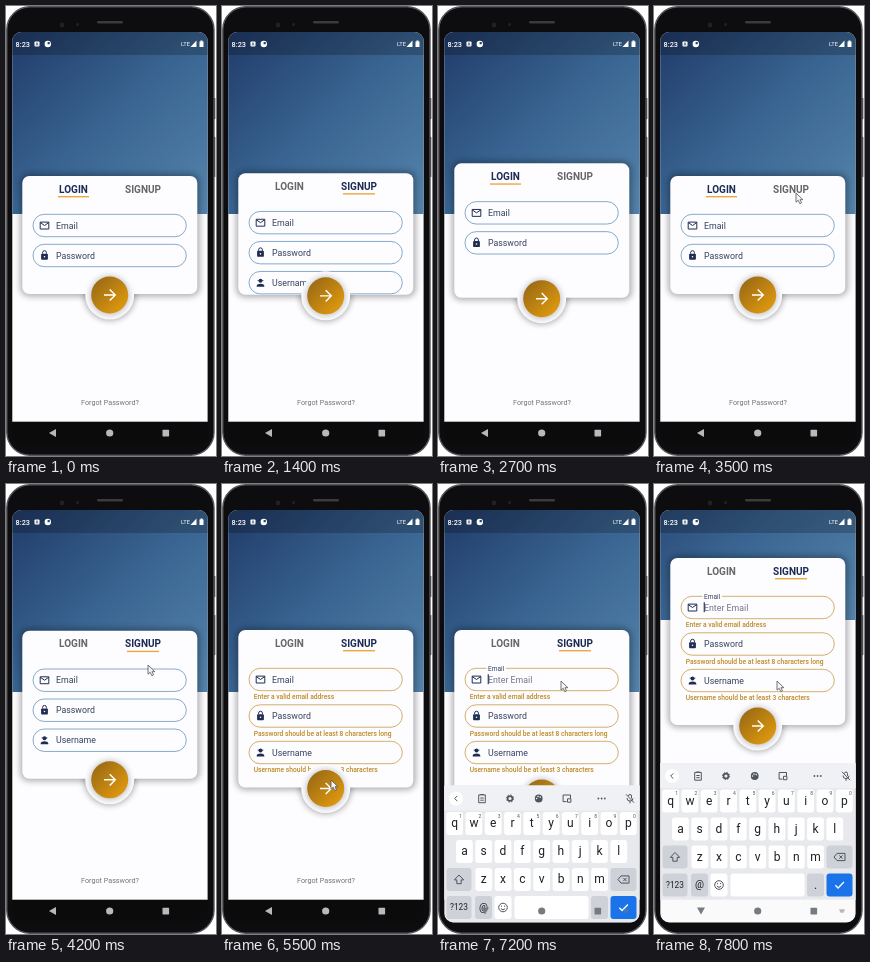
Animation of 210x450 px, one loop 8000 ms. Source, as an HTML page:

```html
<!DOCTYPE html>
<html lang="en">
<head>
<meta charset="utf-8">
<title>Login and signup</title>
<style>
  html, body { margin: 0; width: 100%; height: 100%; overflow: hidden; background: #fff; }
  svg { display: block; width: 210px; height: 450px; font-family: Roboto, sans-serif; }
  .mid { text-anchor: middle; }
  .tab { font-size: 10px; font-weight: 700; text-anchor: middle; }
  .label { font-size: 8.8px; fill: #35425f; }
  .box { fill: none; stroke-width: .8; }
  .error { font-size: 6.7px; font-weight: 500; fill: #bd8a26; }
  .line { fill: none; stroke: #1f2d52; stroke-width: 1; }
  .solid { fill: #1f2d52; }
  .tool { fill: none; stroke: #50555c; stroke-width: 1; }
</style>
</head>
<body>
<svg viewBox="0 0 210 450">
  <defs>
    <linearGradient id="sky" x1="0" y1="0" x2="1" y2="1">
      <stop offset="0" stop-color="#203b69"/>
      <stop offset=".5" stop-color="#3a6592"/>
      <stop offset="1" stop-color="#5584ac"/>
    </linearGradient>
    <linearGradient id="gold" x1="0" y1="0" x2="1" y2="1">
      <stop offset=".1" stop-color="#9a6a14"/>
      <stop offset=".9" stop-color="#e09a0e"/>
    </linearGradient>
    <filter id="soft" x="-30%" y="-30%" width="160%" height="160%"><feGaussianBlur stdDeviation="3"/></filter>
    <clipPath id="screen"><rect x="6.3" y="26" width="195.3" height="412.5" rx="9"/></clipPath>
    <clipPath id="cardClip"><rect id="clipBox" x="16.3" width="175" rx="7"/></clipPath>
  </defs>

  <path d="M207 92h2.3v21H207zM207 131h2.3v40H207z" fill="#333"/>
  <rect x=".8" y=".8" width="207.2" height="448.4" rx="23" fill="#0d0d0f" stroke="#55555a" stroke-width="1.4"/>
  <rect x="91" y="15" width="26" height="2.5" rx="1.2" fill="#3b3b3d"/>
  <g fill="#222226"><circle cx="56" cy="19" r="2.4"/><circle cx="71.5" cy="18.5" r="1.5"/></g>

  <g clip-path="url(#screen)">
    <rect x="6" y="26" width="197" height="390" fill="#fdfcfe"/>
    <g id="page">
      <rect x="6" y="26" width="197" height="182" fill="url(#sky)"/>
      <rect id="cardShadow" x="14" width="180" rx="9" opacity=".3" filter="url(#soft)"/>
      <circle id="buttonShadow" cx="103.7" r="25.5" opacity=".32" filter="url(#soft)"/>
      <rect id="card" x="16.3" width="175" rx="7" fill="#fdfcfe"/>
      <g clip-path="url(#cardClip)"><g id="form">
        <text id="login" class="tab" x="67.5" y="16.6">LOGIN</text>
        <text id="signup" class="tab" x="137" y="16.6">SIGNUP</text>
        <rect id="underline" y="20" height="1.4" fill="#eba83f"/>
        <g id="fields"></g>
      </g></g>
      <g id="button">
        <circle r="24.5" fill="#fdfcfe"/>
        <circle cy=".5" r="19.5" opacity=".25" filter="url(#soft)"/>
        <circle r="18.5" fill="url(#gold)"/>
        <path d="M-5.7 0H5.5M0-5.6L5.6 0L0 5.6" fill="none" stroke="#fff" stroke-width="1.4"/>
      </g>
      <text class="mid" x="104" y="399.4" font-size="7.2" fill="#747478">Forgot Password?</text>
    </g>

    <rect x="6" y="26" width="197" height="23" opacity=".22"/>
    <g fill="#fff">
      <text x="9.6" y="40.5" font-size="7.3" font-weight="500">8:23</text>
      <rect x="28.5" y="35.5" width="5" height="5" rx=".8"/>
      <path d="M30 39.6l1-3 1 3" fill="none" stroke="#29456a" stroke-width=".7"/>
      <circle cx="41.8" cy="38" r="3.2"/>
      <path d="M41.6 38.2v-2.2h2.2v2.2z" fill="#29456a"/>
      <text x="175" y="40.2" font-size="5.8">LTE</text>
      <path d="M184.5 41l6-6.5V41zM193.5 35.4h1v-.9h2v.9h1V41h-4z"/>
    </g>

    <rect x="6" y="415.7" width="197" height="24" fill="#0b0b0c"/>
    <g id="keyboard"></g>
    <g id="nav">
      <path id="back"/>
      <circle cx="103.7" cy="427" r="3.6"/>
      <rect x="156.5" y="423.8" width="6.6" height="6.6" rx=".6"/>
      <path id="switcher" d="M185 425.3h6l-1.5 3.5h-3z" opacity=".5"/>
    </g>
  </g>
  <path id="cursor" d="M0 0V9.2L2.2 7.3L3.8 10.7L5.5 9.9L4 6.7H6.9Z" fill="#f4f4f4" stroke="#555" stroke-width=".8"/>
</svg>

<script>
const $ = id => document.getElementById(id);
const set = (id, attrs) => { for (const k in attrs) $(id).setAttribute(k, attrs[k]); };
const show = (id, on) => set(id, { visibility: on ? 'visible' : 'hidden' });
const clamp = v => Math.min(1, Math.max(0, v));
const mix = (a, b, p) => a + (b - a) * p;

function bounceOut(p) {
  p = clamp(p);
  const n = 7.5625, d = 2.75;
  if (p < 1 / d) return n * p * p;
  if (p < 2 / d) return n * (p - 1.5 / d) ** 2 + .75;
  if (p < 2.5 / d) return n * (p - 2.25 / d) ** 2 + .9375;
  return n * (p - 2.625 / d) ** 2 + .984375;
}

// Form fields, centred on y = 0 of their own group
const fields = [
  ['Email', 'Enter a valid email address',
    '<path class="line" d="M34.2-3.4h8.6v6.9h-8.6zM34.2-3l4.3 3l4.3-3"/>'],
  ['Password', 'Password should be at least 8 characters long',
    '<rect class="solid" x="35.1" y="-1.8" width="6.8" height="6" rx=".9"/><path class="line" d="M36.6-1.8v-1.1a1.9 1.9 0 0 1 3.8 0v1.1"/><circle cx="38.5" cy="1.2" r=".8" fill="#fff"/>'],
  ['Username', 'Username should be at least 3 characters',
    '<circle class="solid" cx="38.5" cy="-1.9" r="2"/><path class="solid" d="M35.6-2.7h5.8v.8h-5.8zM34.7 4.1V3c0-2.7 7.6-2.7 7.6 0v1.1z"/>']
];
$('fields').innerHTML = fields.map(([name, error, icon], i) => `
  <g id="field${i}">
    <rect class="box" x="27" y="-11.2" width="153.3" height="22.4" rx="11.2"/>${icon}
    ${i ? '' : '<rect id="gap" x="48.5" y="-13" width="19.5" height="4" fill="#fdfcfe"/><text id="hint" class="label" x="50" y="3.1" style="fill:#73768a">Enter Email</text>'}
    <text id="label${i}" class="label" x="50" y="3.1">${name}</text>
    <text class="error" x="31.7" y="19.6">${error}</text>
  </g>`).join('') + '<rect id="caret" x="49.7" y="44.2" width="1.1" height="10" fill="#1f2d52"/>';

// Keyboard in its resting place
const key = (x, y, w, text = '', fill = '#fff', size = 12) =>
  `<rect x="${x - w / 2}" y="${y - 11.5}" width="${w}" height="23" rx="3" fill="${fill}"/>
   <text class="mid" x="${x}" y="${y + size * .32}" font-size="${size}" fill="#1d1f23">${text}</text>`;
const row = (letters, x, y) => [...letters].map((c, i) => key(x + i * 19.3, y, 16.8, c)).join('');
const grey = '#ced2d8';
$('keyboard').innerHTML = `
  <rect x="6" y="279" width="197" height="137" fill="#e7e9ed"/>
  <rect x="6" y="279" width="197" height="25" fill="#eff1f4"/>
  <rect x="6" y="415.7" width="197" height="50" fill="#fafafb"/>
  <circle cx="18" cy="292" r="7" fill="#fff"/>
  <g class="tool">
    <path d="M19.3 289.4l-2.6 2.6l2.6 2.6M40.7 288.4h6.6v7.8h-6.6zM42.4 288h3.2M42.3 291.5h3.4M42.3 293.7h3.4"/>
    <circle cx="72" cy="292" r="2.4" stroke-width="1.6"/>
    <circle cx="72" cy="292" r="3.6" stroke-dasharray="1.4 1.43"/>
    <path d="M132.5 292v-3.5h-7.4v6.6h3.4M129.5 292.3h3.4v3.4h-3.4z"/>
    <path d="M190.5 289.5a1.5 1.5 0 0 1 3 0v2.4M189 291.5a3 3 0 0 0 6 .2M192 294.5v2.3M188 287.8l8 8.4"/>
  </g>
  <circle cx="100.7" cy="292" r="3.9" fill="#50555c"/>
  <g fill="#eff1f4"><circle cx="98.6" cy="292" r=".8"/><circle cx="100" cy="290" r=".8"/><circle cx="102.2" cy="290.6" r=".8"/></g>
  <g fill="#50555c"><circle cx="160.4" cy="292" r=".9"/><circle cx="163.6" cy="292" r=".9"/><circle cx="166.8" cy="292" r=".9"/></g>
  ${row('qwertyuiop', 16.6, 317)}${row('asdfghjkl', 26.4, 345)}${row('zxcvbnm', 45.8, 373)}
  ${[...'1234567890'].map((c, i) => `<text x="${21.2 + i * 19.3}" y="311" font-size="5" fill="#555">${c}</text>`).join('')}
  ${key(21, 373, 25, '', grey)}${key(185.5, 373, 26, '', grey)}
  ${key(21, 401, 25, '?123', grey, 8.3)}${key(45.5, 401, 17, '@', grey, 10)}${key(65, 401, 17)}
  ${key(113.5, 401, 74)}${key(161.5, 401, 17, '.', grey)}${key(185.5, 401, 26, '', '#1a73e8')}
  <g class="tool">
    <path d="M21 368.5l-4.7 4.9h2.5v3.8h4.4v-3.8h2.5zM180 373l3-3.6h8v7.2h-8zM185.3 371.4l3.2 3.2M188.5 371.4l-3.2 3.2"/>
    <circle cx="65" cy="401" r="4.3"/><path d="M62.9 402.2q2.1 2.4 4.2 0M63.4 399v1.2M66.6 399v1.2"/>
    <path d="M181.3 401.2l2.8 2.8l5.8-6" stroke="#fff" stroke-width="1.3"/>
  </g>`;

// Pointer stops: time, x, y; a stop without a place hides it
const stops = [[0], [2200, 75, 157], [2600], [3500, 142, 187], [3700, 142, 181], [4600, 142, 181], [4700],
  [4800, 115, 302], [5100, 109, 296], [6100, 109, 296], [6500, 123, 197], [8000, 123, 197]];

function drawCursor(t) {
  const i = stops.findLastIndex(s => s[0] <= t);
  const [t0, x0, y0] = stops[i], [t1, x1 = x0, y1 = y0] = stops[i + 1];
  show('cursor', x0 !== undefined);
  if (x0 === undefined) return;
  const p = (t - t0) / (t1 - t0);
  set('cursor', { transform: `translate(${mix(x0, x1, p)} ${mix(y0, y1, p)})` });
}

function draw(t) {
  const signup = t >= 1300 && t < 2500 || t >= 3900;
  const failed = t >= 5400, focused = t >= 6800, typing = t >= 6900;
  const open = bounceOut((t - 1300) / 800) - bounceOut((t - 2500) / 800) + bounceOut((t - 3900) / 800);
  const top = 170 - 24 * open;
  const height = 118 + 31 * open + 18 * bounceOut((t - 5400) / 400);
  const bottom = top + height + 1;

  set('card', { y: top, height });
  set('clipBox', { y: top, height });
  set('cardShadow', { y: top - 2.5, height: height + 5 });
  set('buttonShadow', { cy: bottom });
  set('button', { transform: `translate(103.7 ${bottom})` });
  set('form', { transform: `translate(0 ${top})` });
  set('login', { fill: signup ? '#66666a' : '#1c2b55' });
  set('signup', { fill: signup ? '#1c2b55' : '#66666a' });
  set('underline', { x: signup ? 121 : 52, width: signup ? 32 : 31 });

  fields.forEach((_, i) => set('field' + i, { transform: `translate(0 ${49.5 + i * (failed ? 36.5 : 30)})` }));
  show('field2', signup);
  document.querySelectorAll('.box').forEach(b => b.setAttribute('stroke', failed ? '#c79c49' : '#6a96bd'));
  document.querySelectorAll('.error').forEach(e => e.setAttribute('opacity', failed ? 1 : 0));

  const float = clamp((t - 6800) / 200);
  $('label0').style.fontSize = mix(8.8, 6.6, float) + 'px';
  set('label0', { y: mix(3.1, -8.2, float) });
  set('hint', { opacity: float });
  show('gap', focused);
  show('caret', focused && (t < 7300 || t >= 7800));

  const scroll = 1 - (1 - clamp((t - 7300) / 300)) ** 2;
  set('page', { transform: `translate(0 ${-72 * scroll})` });
  show('keyboard', typing);
  set('keyboard', { transform: `translate(0 ${160 * (1 - clamp((t - 6900) / 480)) ** 2})` });
  set('nav', { fill: typing ? '#777b80' : '#b9b9bb' });
  set('back', { d: typing ? 'M43 423.6h8L47 430.6z' : 'M50 423v8L43 427z' });
  show('switcher', typing);
  drawCursor(t);
}

function tick(now) {
  draw(Math.floor(now % 8000 / 100) * 100);
  requestAnimationFrame(tick);
}
draw(0);
requestAnimationFrame(tick);
</script>
</body>
</html>
```
